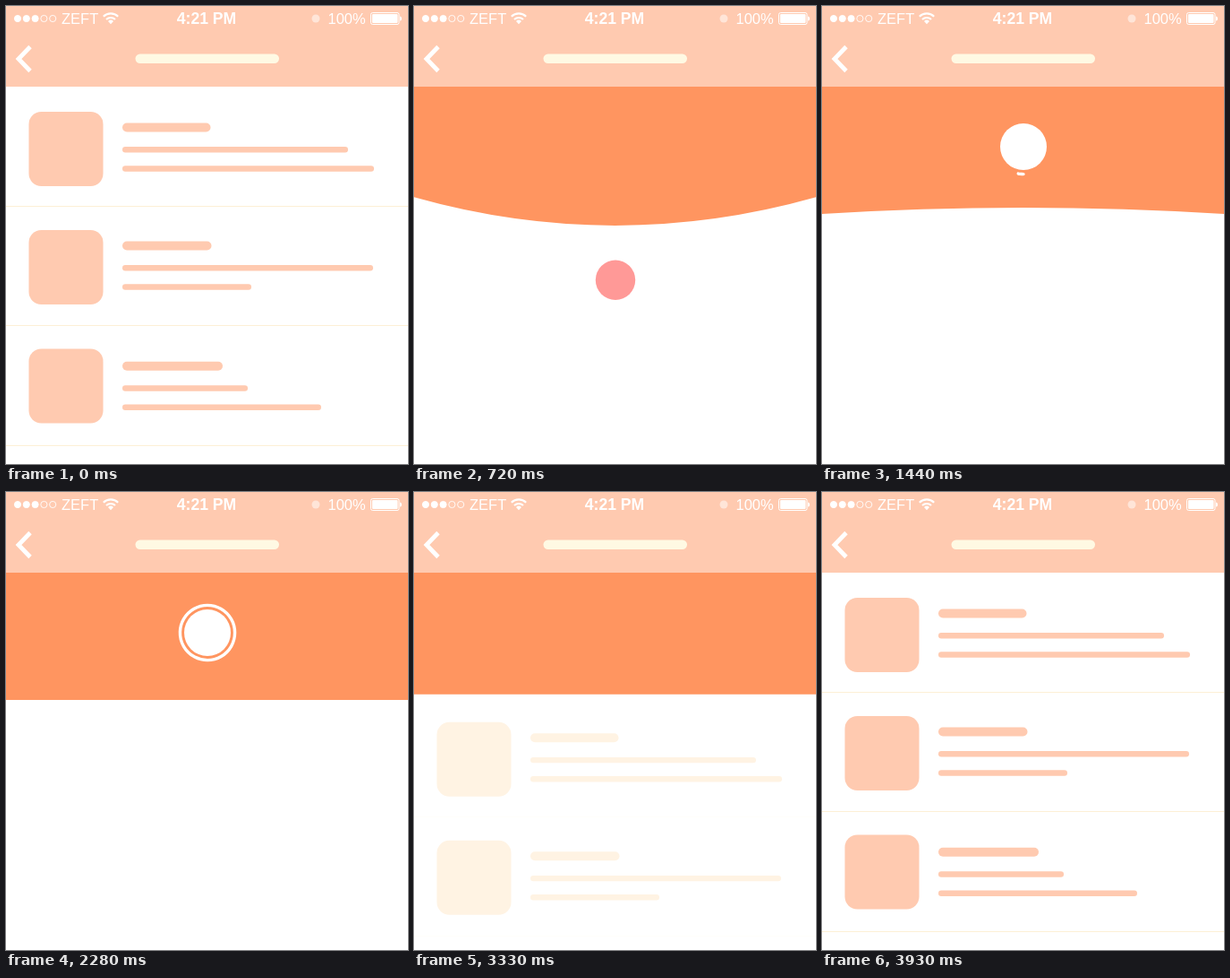
Write an HTML page that moves like this. It is 449 px wide and 511 px high and loops after 5520 ms.

```html
<!DOCTYPE html>
<html lang="en">
<head>
<meta charset="utf-8">
<title>Pull to refresh</title>
<style>
  html, body { margin: 0; width: 100%; height: 100%; overflow: hidden; background: #fff; }
  svg { display: block; width: 100%; height: 100%; }
  text { font-family: "Liberation Sans", Arial, sans-serif; fill: #fff; }
</style>
</head>
<body>
<svg viewBox="0 0 449 511">
  <rect width="449" height="511" fill="#fff"/>
  <g id="list"></g>
  <path id="sheet" fill="#ff9560"/>
  <g id="loader">
    <circle id="ball" cx="225" r="26" fill="#fff"/>
    <path id="ring" fill="none" stroke="#fff" stroke-width="3.4" stroke-linecap="round"/>
  </g>
  <circle id="touch" cx="225" r="22.2" fill="#ff9997"/>

  <rect width="449" height="90" fill="#ffcab0"/>
  <g id="signal" stroke="#fff"></g>
  <text x="62" y="20" font-size="16.5">ZEFT</text>
  <g fill="none" stroke="#fff" stroke-width="2.2">
    <path d="M108.8 11.7a11.8 11.8 0 0 1 16.4 0"/>
    <path d="M112 15a7.3 7.3 0 0 1 10 0"/>
  </g>
  <path d="M117 20.2l-3-3.2a4.3 4.3 0 0 1 6 0z" fill="#fff"/>
  <text x="224" y="20.2" font-size="17.6" font-weight="700" text-anchor="middle">4:21 PM</text>
  <circle cx="346" cy="14" r="4.5" fill="#fff" opacity=".5"/>
  <text x="359.5" y="20" font-size="16.5">100%</text>
  <rect x="407.5" y="7.5" width="31.5" height="13" rx="2" fill="none" stroke="#fff"/>
  <rect x="409" y="9" width="28.5" height="10" rx="1" fill="#fff"/>
  <path d="M440 11.5a2 2.5 0 0 1 0 5z" fill="#fff"/>
  <path d="M27 45.5L14 59L27 72.5" fill="none" stroke="#fff" stroke-width="4.8"/>
  <rect x="144.5" y="53.5" width="160.5" height="10.5" rx="5.25" fill="#fff9e3"/>
</svg>
<script>
const LOOP = 5520, TOP = 90, REST = 142, PULL = 188;
const CREAM = [255, 245, 230], PEACH = [255, 202, 176];
const $ = id => document.getElementById(id);
const list = $("list"), sheet = $("sheet"), loader = $("loader");
const ball = $("ball"), ring = $("ring"), touch = $("touch");

const span = (t, a, b) => Math.min(1, Math.max(0, (t - a) / (b - a)));
const mix = (a, b, k) => a + (b - a) * k;
const easeInOut = u => u < .5 ? 2 * u * u : 1 - 2 * (1 - u) ** 2;
const easeOut = u => 1 - (1 - u) ** 2;

function add(parent, tag, attrs) {
  const node = document.createElementNS("http://www.w3.org/2000/svg", tag);
  for (const name in attrs) node.setAttribute(name, attrs[name]);
  return parent.appendChild(node);
}

function set(node, attrs) {
  for (const name in attrs) node.setAttribute(name, attrs[name]);
}

function bar(parent, x, y, width, height, rx = height / 2) {
  add(parent, "rect", { x, y, width, height, rx });
}

const rules = add(list, "g", { fill: "#fdf0d6" });
const rows = add(list, "g", {});
[
  { box: 118, text: 130.5, rule: 223, widths: [98.5, 252, 281] },
  { box: 250, text: 262.5, rule: 356, widths: [99.5, 280, 144] },
  { box: 382.5, text: 396.7, rule: 490, widths: [112, 140, 222] }
].forEach(({ box, text, rule, widths }) => {
  bar(rows, 25.5, box, 83, 83, 14);
  bar(rows, 130, text, widths[0], 10);
  bar(rows, 130, text + 26.6, widths[1], 6.4);
  bar(rows, 130, text + 47.8, widths[2], 6.4);
  bar(rules, 0, rule, 449, 1, 0);
});

for (let i = 0; i < 5; i++) {
  add($("signal"), "circle", {
    cx: 13 + i * 9.8, cy: 14, r: 3.6, "stroke-width": .9, fill: i < 3 ? "#fff" : "none"
  });
}

// Bottom edge of the orange sheet: height at the sides and bulge in the middle.
function edgeAt(t, pull) {
  if (t >= 3233) return [TOP + REST * (1 - easeInOut(span(t, 3233, 3900))), 0];
  const side = TOP + REST * pull ** .75;
  if (t < 960) return [side, 46 * pull ** 2];
  const s = t - 960;
  const spring = 46 * Math.exp(-.00304 * s) * Math.cos(s * Math.PI / 660);
  return [side, spring * (1 - span(t, 2000, 2280))];
}

function drawList(t, side) {
  const leaving = t < 2000;
  const tint = leaving ? 1 - span(t, 240, 500) : span(t, 3300, 3930);
  const shown = leaving ? 1 - span(t, 420, 640) : span(t, 3000, 3300);
  const shift = leaving ? side - TOP : REST * (1 - easeInOut(span(t, 3265, 3885)));
  set(list, { transform: `translate(0 ${shift})`, opacity: shown });
  set(rows, { fill: `rgb(${CREAM.map((c, i) => Math.round(mix(c, PEACH[i], tint)))})` });
  set(rules, { opacity: mix(.12, 1, tint ** 1.5) });
}

function drawLoader(t) {
  const scale = t < 2880 ? mix(1, 1.15, easeOut(span(t, 2760, 2880)))
                         : 1.15 * (1 - span(t, 2880, 3060) ** 2);
  const visible = t > 1080 && scale > 0;
  set(loader, {
    visibility: visible ? "visible" : "hidden",
    transform: `translate(225 157) scale(${scale}) translate(-225 -157)`
  });
  set(ball, { cy: mix(290, 157, easeOut(span(t, 1080, 1400))) });

  const turn = span(t, 1415, 2275), r = 30.6;
  const point = k => {
    const a = Math.PI * (.5 + 2 * k);
    return `${225 + r * Math.cos(a)} ${157 + r * Math.sin(a)}`;
  };
  const arc = k => `A${r} ${r} 0 0 1 ${point(k)}`;
  set(ring, { d: turn ? `M${point(0)}${arc(turn / 3)}${arc(turn * 2 / 3)}${arc(turn)}` : "" });
}

function draw(t) {
  const pull = easeInOut(span(t, 240, 920));
  const [side, bulge] = edgeAt(t, pull);
  set(sheet, { d: `M0 ${TOP - 1}H449V${side}Q224.5 ${side + 2 * bulge} 0 ${side}Z` });
  set(touch, {
    cy: 150 + PULL * pull,
    opacity: span(t, 60, 210) * (1 - span(t, 930, 1050))
  });
  drawList(t, side);
  drawLoader(t);
}

const start = performance.now();
function tick() {
  draw((performance.now() - start) % LOOP);
  requestAnimationFrame(tick);
}
tick();
</script>
</body>
</html>
```
